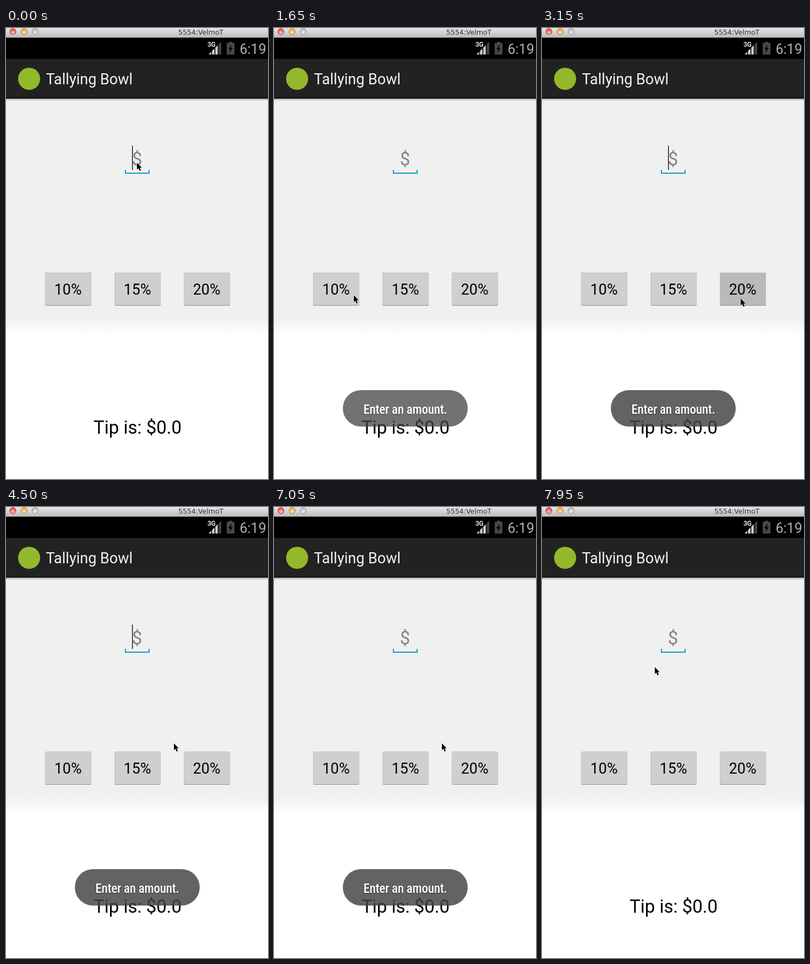
An HTML page for the animation above (8 s loop, 476 by 817 pixels).

```html
<!DOCTYPE html>
<html lang="en">
<head>
<meta charset="utf-8">
<title>Tip calculator</title>
<style>
  html, body { margin: 0; width: 100%; height: 100%; overflow: hidden; background: #fff; }
  svg { display: block; width: 476px; height: 817px; }
  text { font-family: Roboto, "Noto Sans", sans-serif; }
  .window { font: 12.5px "DejaVu Sans", sans-serif; }
  .mid { text-anchor: middle; }
  .toast { font-family: "Roboto Condensed", Roboto, sans-serif; font-stretch: 75%; font-size: 23px; font-weight: 500; letter-spacing: -.25px; text-shadow: 0 1px 2px #0009; }
</style>
</head>
<body>
<svg viewBox="0 0 476 817">
  <defs>
    <linearGradient id="chrome" x2="0" y2="1">
      <stop stop-color="#e6e6e6"/><stop offset="1" stop-color="#bababa"/>
    </linearGradient>
    <linearGradient id="fade" x2="0" y2="1">
      <stop stop-color="#f0f0f0"/><stop offset="1" stop-color="#fff"/>
    </linearGradient>
    <linearGradient id="shade" x2="0" y2="1">
      <stop stop-color="#aaa"/><stop offset="1" stop-color="#eee"/>
    </linearGradient>
    <radialGradient id="shine" cy=".75" r=".65">
      <stop stop-color="#fff" stop-opacity=".7"/><stop offset="1" stop-color="#fff" stop-opacity="0"/>
    </radialGradient>
  </defs>

  <!-- page -->
  <rect width="476" height="817" fill="#fff"/>
  <rect y="128" width="476" height="396" fill="#f0f0f0"/>
  <rect y="524" width="476" height="32" fill="url(#fade)"/>

  <!-- window bar -->
  <rect width="476" height="18" fill="url(#chrome)"/>
  <g id="lights" stroke-width="1"></g>
  <text class="window" x="313" y="11.5" fill="#333">5554:VelmoT</text>

  <!-- status bar -->
  <rect y="17.5" width="476" height="38.5" fill="#000"/>
  <path d="M368 48L391 25V48Z" fill="#444"/>
  <path d="M368 48L385 31V48Z" fill="#ccc"/>
  <path d="M373.5 40V48M379.5 34V48M385.5 28V48" stroke="#000" stroke-width="1.5"/>
  <text x="366" y="34" font-size="12" font-weight="700" fill="#ddd" letter-spacing="-.5">3G</text>
  <path d="M405 25H411V27H415V48H401V27H405Z" fill="#484848"/>
  <path d="M410 30L404 38.5H407.5L406 45L412 36.5H408.5Z" fill="#000"/>
  <text x="424.5" y="46.5" font-size="25" fill="#b0b0b0">6:19</text>

  <!-- action bar -->
  <rect y="56" width="476" height="72" fill="#222"/>
  <rect y="125.5" width="476" height="2.5" fill="#161616"/>
  <rect y="128" width="476" height="4" fill="url(#shade)"/>
  <circle cx="42" cy="92" r="20" fill="#93b92b"/>
  <text x="72.5" y="102" font-size="27" fill="#f3f3f3">Tallying Bowl</text>

  <!-- amount field -->
  <text class="mid" x="238" y="248.5" font-size="33" fill="#858585">$</text>
  <path d="M217 257V263H260V257" fill="none" stroke="#0f99cc" stroke-width="2"/>
  <rect id="caret" x="229" y="213" width="1.3" height="44" fill="#000"/>

  <g id="buttons"></g>
  <text class="mid" x="239" y="734.5" font-size="33" fill="#000">Tip is: $0.0</text>

  <g id="toast">
    <rect x="125" y="656" width="227" height="66" rx="33" fill="#444" fill-opacity=".83"/>
    <text class="mid toast" x="238.5" y="699" fill="#fff">Enter an amount.</text>
  </g>

  <path id="pointer" d="M0 0V12.5L2.7 10L5 15L7.2 14L5 9.2H8.8Z" fill="#000" stroke="#fff" stroke-width="1" paint-order="stroke"/>
</svg>

<script>
const LOOP = 8000, STEP = 150, BLINK = 1010;
const el = id => document.getElementById(id);

el('lights').innerHTML = [[12.5, '#ee4f48', '#a33'], [33, '#f5b143', '#a87425'], [53, '#c4c4c4', '#888']]
  .map(([x, fill, edge]) =>
    `<circle cx="${x}" cy="6.5" r="5.5" fill="${fill}" stroke="${edge}"/>` +
    `<circle cx="${x}" cy="6.5" r="5" fill="url(#shine)"/>`).join('');

el('buttons').innerHTML = [10, 15, 20].map((n, i) => {
  const x = 71 + i * 126;
  return `<rect x="${x}" y="444" width="84" height="59" rx="2" fill="#8c8c8c"/>` +
    `<rect x="${x}" y="443" width="84" height="59" rx="2" fill="#c0c0c0"/>` +
    `<rect class="face" x="${x + .7}" y="444" width="82.6" height="58" rx="1.5"/>` +
    `<text class="mid" x="${x + 41.7}" y="483" font-size="26.8">${n}%</text>`;
}).join('');
const faces = document.querySelectorAll('.face');

// time, x, y
const path = [
  [0, 238, 244], [300, 238, 244], [1050, 112, 482], [1500, 112, 482],
  [1950, 239, 490], [2400, 239, 490], [3000, 361, 490], [3300, 361, 490],
  [3900, 305, 428], [7200, 305, 428], [7650, 212, 399], [7950, 205, 290]
];
// time, opacity
const fades = [
  [0, 0], [1350, 0], [1500, .4], [1650, .9], [1800, 1], [3450, 1], [3600, .85],
  [3750, .9], [3900, 1], [5400, 1], [5550, .85], [5700, .9], [5850, 1],
  [7500, 1], [7650, .82], [7800, .35], [7950, 0]
];
// start and end of each press
const presses = [[1350, 1500], [2100, 2250], [3150, 3300]];

const smooth = k => k * k * (3 - 2 * k);

function at(table, t) {
  const i = table.findIndex(row => row[0] >= t);
  if (i < 1) return table[i < 0 ? table.length - 1 : 0].slice(1);
  const [t0, ...a] = table[i - 1], [t1, ...b] = table[i];
  const k = smooth((t - t0) / (t1 - t0));
  return a.map((v, j) => v + (b[j] - v) * k);
}

function draw(now) {
  const raw = now % LOOP;
  const t = raw < 450 ? 0 : Math.floor(raw / STEP) * STEP;
  const [x, y] = at(path, t).map(Math.round);
  el('pointer').setAttribute('transform', `translate(${x} ${y})`);
  el('toast').setAttribute('opacity', at(fades, t)[0]);
  el('caret').setAttribute('opacity', t % BLINK < BLINK / 2 ? 1 : 0);
  presses.forEach(([a, b], i) => faces[i].setAttribute('fill', t >= a && t < b ? '#bababa' : '#cfcfcf'));
}

let start;
function tick(now) {
  start ??= now;
  draw(Math.max(0, now - start));
  requestAnimationFrame(tick);
}
draw(0);
requestAnimationFrame(tick);
</script>
</body>
</html>
```
